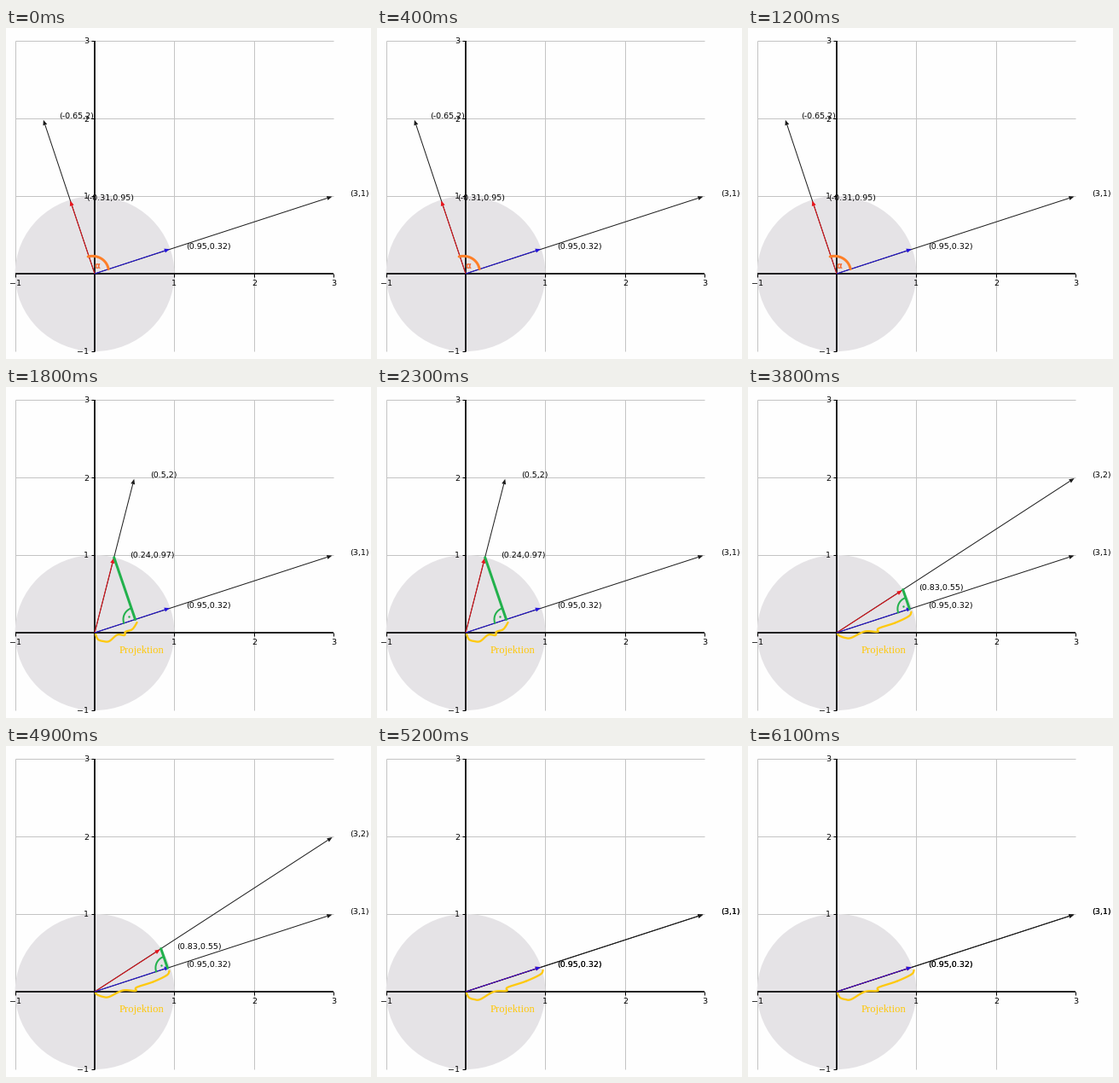
Write a matplotlib script that moves like this. It is 428 px wide and 388 px high and loops after 6300 ms.

```python
import numpy as np
import matplotlib.pyplot as plt
from matplotlib.animation import FuncAnimation
from matplotlib.patches import Ellipse, Polygon

W, H, DPI = 428, 388, 100
PX = 72 / DPI               # points per pixel
STEP, FRAMES = 100, 63
SCENE_MS = 1250             # time each scene is shown

OX, OY, UX, UY = 104, 288, 93.4, 91    # origin and unit lengths in pixels
RED, BLUE, GRID = "#e8141c", "#2414dc", "#c4c4c4"
ORANGE, GREEN, YELLOW = "#ff7f27", "#22b14c", "#ffc90e"

fig = plt.figure(figsize=(W / DPI, H / DPI), dpi=DPI, facecolor="#fefefe")
ax = fig.add_axes([0, 0, 1, 1])
ax.set_xlim(0, W)
ax.set_ylim(H, 0)
ax.axis("off")


def pos(x, y):
    return np.array([OX + UX * x, OY - UY * y])


def unit(v):
    return np.array(v) / np.hypot(*v)


def line(points, color, width, z=2, cap="butt"):
    xs, ys = zip(*points)
    return ax.plot(xs, ys, color=color, lw=width * PX, zorder=z,
                   solid_capstyle=cap, solid_joinstyle="round")[0]


def pen(points, color, width):
    return line(points, color, width, 6, "round")


def text(x, y, s, size=9.5, color="black", **kw):
    return ax.text(x, y, s, fontsize=size * PX, color=color, zorder=8, **kw)


def smooth(points, n=8):
    """Catmull-Rom curve through the points."""
    p = np.array([points[0], *points, points[-1]], float)
    t = np.linspace(0, 1, n)[:, None]
    return np.vstack([
        0.5 * (2 * b + (c - a) * t + (2 * a - 5 * b + 4 * c - d) * t**2
               + (3 * b - a - 3 * c + d) * t**3)
        for a, b, c, d in zip(p, p[1:], p[2:], p[3:])])


def arrow(x, y, color, z=4, gap=0):
    """Arrow from the origin that stops gap pixels before (x, y)."""
    start, end = pos(0, 0), pos(x, y)
    u = unit(end - start)
    tip = end - gap * u
    base = tip - 6.2 * u
    side = 2.5 * np.array([-u[1], u[0]])
    head = Polygon([tip, base + side, base - side], fc=color, ec="none", zorder=z)
    return [line([start, base], color, 1, z), ax.add_patch(head)]


def label(x, y):
    return text(*pos(x + 0.2, y), f"({x:g},{y:g})", va="baseline")


def vector(end, color, z=4.5):
    """Full vector in black, its unit vector in color, both labelled."""
    short = np.round(unit(end), 2)
    return [*arrow(*end, "#1c1c1c", gap=1.8), *arrow(*short, color, z, 0.8),
            label(*end), label(*short)]


def draw_base():
    ax.add_patch(Ellipse((OX, OY), 2 * UX, 2 * UY, fc="#e5e3e6", ec="none", zorder=1))
    for v in (-1, 1, 2, 3):
        x, y = pos(v, v)
        if v < 3:
            line([(x, OY - 3 * UY), (x, OY + UY)], GRID, 1, 0.5)
        if v > 0:
            line([(OX - UX, y), (OX + 3 * UX, y)], GRID, 1, 0.5)
        line([(x, OY), (x, OY + 4)], "black", 1)
        line([(OX - 4, y), (OX, y)], "black", 1)
        name = str(v).replace("-", "\u2212")
        text(x, 299, name, ha="center", va="center_baseline")
        text(97, y + 3.5, name, ha="right", va="baseline")
    line([pos(-1, 0), pos(3, 0)], "black", 1.7, 3)
    line([pos(0, -1), pos(0, 3)], "black", 1.7, 3)
    vector((3, 1), BLUE, 5)


def angle_mark(end):
    a = np.linspace(np.arctan2(end[1], end[0]) + 0.06, np.arctan2(1, 3), 30)
    r = np.linspace(21.5, 17, 30)
    arc = np.column_stack([OX + r * np.cos(a), OY - r * np.sin(a)])
    return [pen(arc, ORANGE, 3),
            text(107, 282, "\u03b1", 10, "#f4703a", ha="center", va="baseline",
                 weight="bold")]


def brace(mid, end, sag):
    """Hand-drawn brace: sags to a depth, kinks at mid, then climbs to end."""
    (mx, my), (ex, ey) = mid, end
    return pen(smooth([
        (OX + 1, OY + 2), (OX + 4, sag - 2), (OX + 10, sag), (OX + 17, sag),
        ((OX + 18 + mx) / 2, (sag + my) / 2 - 4), (mx, my), (mx + 1, my - 4),
        ((mx + ex) / 2 + 1, (my + ey) / 2 + 1), (ex - 3, ey + 5), (ex, ey)]),
        YELLOW, 2.3)


def right_angle(tip, foot, r=14):
    """Perpendicular with a quarter arc and a dot at its foot."""
    up, back = unit(tip - foot), unit(pos(0, 0) - foot)
    t = np.linspace(0, np.pi / 2, 16)[:, None]
    arc = foot + r * (np.cos(t) * up + np.sin(t) * back)
    dot = foot + 0.4 * r * (up + back)
    return [pen([tip, foot], GREEN, 3), pen(arc, GREEN, 2),
            *ax.plot(*dot, "o", ms=2.4 * PX, color=GREEN, mew=0, zorder=6)]


def projection(end, mid, sag):
    """Drop the unit vector of end onto the blue direction."""
    u, b = unit(end), unit((3, 1))
    tip, foot = pos(*u), pos(*(u @ b * b))
    parts = [brace(mid, foot + (2, 3.5), sag),
             text(132.5, 312, "Projektion", 12.6, YELLOW,
                  family="Liberation Serif", va="baseline")]
    if np.hypot(*(tip - foot)) > 1:
        parts += right_angle(tip, foot)
    return parts


def scene(end, marks):
    return vector(end, RED) + marks


draw_base()
scenes = [scene((-0.65, 2), angle_mark((-0.65, 2)))]
for end, mid, sag in [((0.5, 2), (139, 291), 298), ((2, 2), (147, 291), 298),
                      ((3, 2), (152, 287), 294), ((3, 1), (152, 287), 297)]:
    scenes.append(scene(end, projection(end, mid, sag)))


def update(frame):
    now = min(frame * STEP // SCENE_MS, len(scenes) - 1)
    for i, parts in enumerate(scenes):
        for part in parts:
            part.set_visible(i == now)
    return []


anim = FuncAnimation(fig, update, frames=FRAMES, interval=STEP, repeat=True,
                     repeat_delay=0, blit=False)
plt.show()
```
